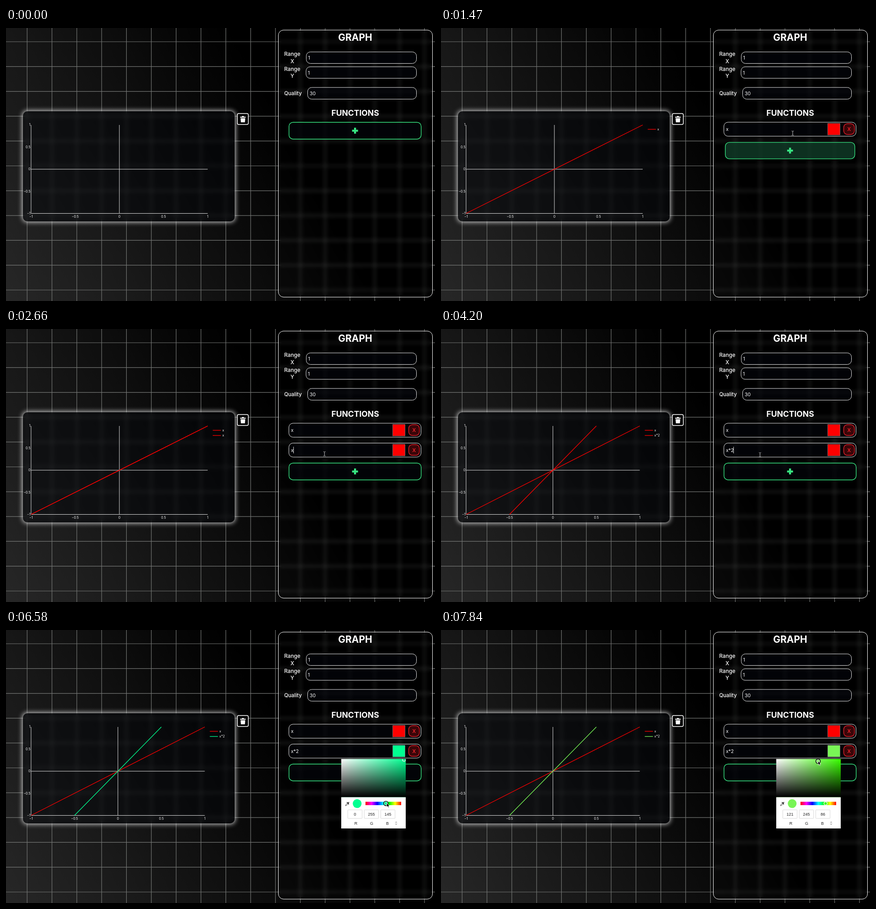
Animation of 938 by 597 pixels, one loop 8 s. Source, as an HTML page:

```html
<!DOCTYPE html>
<html lang="en">
<head>
<meta charset="utf-8">
<title>Graph editor</title>
<style>
html, body { margin: 0; width: 100%; height: 100%; overflow: hidden; background: #000; }
body { position: relative; }
#stage { position: absolute; left: 0; top: 0; width: 938px; height: 597px; overflow: hidden;
  background: linear-gradient(60deg, #272727, #000 65%); }
svg { position: absolute; left: 0; top: 0; font-family: Inter, sans-serif; }
.glass { position: absolute; box-sizing: border-box; }
#card { left: 36.5px; top: 181.5px; width: 463.5px; height: 241px; border-radius: 10px;
  background: rgba(3,5,10,.45); backdrop-filter: blur(5px); box-shadow: 0 0 11px 1px rgba(255,255,255,.85); }
#panel { left: 594.5px; top: 3.5px; width: 338px; height: 585.5px; border-radius: 12px;
  border: 1.6px solid #fff; background: rgba(0,0,0,.1); backdrop-filter: blur(4px); }
</style>
</head>
<body>
<div id="stage">
  <svg width="938" height="597"><path id="grid" stroke="#737573" stroke-width="1.2"/></svg>
  <div id="card" class="glass"></div>
  <div id="panel" class="glass"></div>
  <svg width="938" height="597">
    <defs>
      <linearGradient id="white"><stop stop-color="#fff"/><stop offset="1" stop-color="#fff" stop-opacity="0"/></linearGradient>
      <linearGradient id="black" x2="0" y2="1"><stop stop-opacity="0"/><stop offset="1"/></linearGradient>
      <linearGradient id="hues"></linearGradient>
      <clipPath id="pick"><rect x="733" y="282" width="141" height="152"/></clipPath>
    </defs>
    <g id="fixed"></g>
    <g id="live"></g>
  </svg>
</div>
<script>
const $ = id => document.getElementById(id);
const GREEN = '#38e582', RED = '#f00', PITCH = 43.5;

const text = (x, y, s, size, extra = '') =>
  `<text x="${x}" y="${y}" font-size="${size}" fill="#fff" ${extra}>${s}</text>`;
const mid = 'text-anchor="middle"';
const rect = (x, y, w, h, r, extra) =>
  `<rect x="${x}" y="${y}" width="${w}" height="${h}" rx="${r}" ${extra}/>`;
const path = (d, extra) => `<path d="${d}" ${extra}/>`;
const circle = (x, y, r, extra) => `<circle cx="${x}" cy="${y}" r="${r}" ${extra}/>`;
const field = (x, y, w, h) => rect(x, y, w, h, 9, 'fill="#04050c" fill-opacity=".6" stroke="#e4e4e4"');

// Smoothed value of [time, ...values] keys
function track(keys, t) {
  if (t <= keys[0][0]) return keys[0].slice(1);
  for (let i = 1; i < keys.length; i++) {
    const a = keys[i - 1], b = keys[i];
    if (t < b[0]) {
      const u = (t - a[0]) / (b[0] - a[0]), e = u * u * (3 - 2 * u);
      return a.slice(1).map((v, j) => v + (b[j + 1] - v) * e);
    }
  }
  return keys[keys.length - 1].slice(1);
}

const POINTER = [
  [500, 930, 358], [1000, 768, 229], [1470, 769, 230], [1950, 763, 268], [2170, 761, 267],
  [2260, 761, 267], [2600, 696.3, 273], [3330, 696.3, 273], [3400, 696.8, 273.4], [3600, 696.8, 273.4],
  [3670, 697, 274], [3800, 697, 274], [3870, 697.5, 275], [4730, 697.5, 275], [5000, 770, 302],
  [5420, 856.5, 270.5], [5680, 856.5, 270.5], [6300, 788, 379], [6370, 788, 379], [6580, 832.6, 378.5],
  [6900, 842.86, 380], [7220, 850, 305], [7700, 824.5, 286.5]
];
// Add button: scale, fill opacity
const BUTTON = [
  [740, 1, 0], [960, 1.04, .2], [1200, 1.04, .2], [1340, .955, .2], [1470, .98, .2], [1650, 1, 0],
  [1760, 1, 0], [1930, 1.04, .2], [2060, 1.04, .2], [2170, .966, .2], [2240, .96, .2], [2480, 1, 0],
  [4780, 1, 0], [5000, 1, .08], [5280, 1, 0]
];

function hsv(h, s, v) {
  return [5, 3, 1].map(n => {
    const k = (n + h / 60) % 6;
    return Math.round(255 * v * (1 - s * Math.max(0, Math.min(k, 4 - k, 1))));
  });
}

function drawFixed() {
  let d = '';
  for (let i = 0; i < 18; i++) d += `M${46.2 + 54.3 * i} 0V597`;
  for (let i = 0; i < 11; i++) d += `M0 ${30 + 54.3 * i}H938`;
  $('grid').setAttribute('d', d);
  for (let i = 0; i <= 6; i++)
    $('hues').innerHTML += `<stop offset="${i / 6}" stop-color="hsl(${360 - 60 * i},100%,50%)"/>`;

  const label = (y, s, size, x = 626) => text(x, y, s, size, mid + ' font-weight="500"');
  $('fixed').innerHTML =
    rect(505.8, 187, 24, 24, 3, 'fill="#050505" stroke="#fff" stroke-width="1.5"') +
    path('M512 194h3.5l1-1.5h3l1 1.5h3.5v2h-12zM512.8 197.3h10.4l-.9 9h-8.6z', 'fill="#fff"') +
    text(763.5, 28.2, 'GRAPH', 21, mid + ' font-weight="700"') +
    text(763.5, 192, 'FUNCTIONS', 17.5, mid + ' font-weight="700"') +
    label(61, 'Range', 11.7) + label(77, 'X', 11.5) + label(93.5, 'Range', 11.7) + label(109, 'Y', 11.5) +
    label(147, 'Quality', 11.4, 627.5) +
    field(656.5, 52.3, 241, 25.2) + text(660.5, 69, '1', 10.5) +
    field(656, 84.8, 241.5, 25.2) + text(660, 101.5, '1', 10.5) +
    field(659.5, 130, 238, 25.6) + text(664, 147, '30', 10.5);
}

function graph(end, curves) {
  const left = 54.8, top = 212, base = 405.5, cy = 308.8, w = end - left, cx = left + w / 2;
  let out = path(`M${left} ${top}V${base}H${end}M${left} ${cy}H${end}M${cx} ${top}V${base}`,
    'fill="none" stroke="#e6e6e6" stroke-width=".95"');
  ['−1', '−0.5', '0', '0.5', '1'].forEach((s, i) => {
    out += text(left + w * i / 4, 414.6, s, 7, mid) +
      text(53.4, 408 - 48.4 * i, s, 7, 'text-anchor="end"');
  });
  curves.forEach(([name, slope, color], i) => {
    const y = 221.5 + 11.3 * i, stroke = `stroke="${color}" stroke-width="1.3"`;
    if (slope) {
      const dx = w / 2 / slope;
      out += path(`M${cx - dx} ${base}L${cx + dx} ${top}`, stroke);
    }
    out += path(`M${end + 11} ${y}h17.8`, stroke) + text(end + 32, y + 2.5, name, 7);
  });
  return out;
}

function row(i, name, color, focus) {
  const y = 206 + PITCH * i;
  return field(618.5, y, 289, 30.6) + text(623, y + 19, name, 10.3) +
    (focus ? rect(844.5, y + .5, 29, 30, 0, 'fill="#000" stroke="#fff" stroke-width="1.4"') : '') +
    rect(845.5 + focus, y + 2.5 + focus, 27 - 2 * focus, 25.5 - 2 * focus, 0,
      `fill="${color}" stroke="${focus ? color : '#777'}" stroke-width=".8"`) +
    rect(880.5, y + 3.2, 23.4, 23.6, 8, 'fill="#3a0609" stroke="#e3202a" stroke-width="1.4"') +
    text(892.2, y + 19.2, 'X', 11, mid + ' font-weight="600" style="fill:#f0242c"');
}

function addButton(y, scale, fill) {
  const cy = y + 18.6;
  return `<g transform="translate(763.2 ${cy}) scale(${scale})">` +
    rect(-144.5, -18.4, 289, 36.8, 9, 'fill="#03050b" fill-opacity=".7"') +
    rect(-144.5, -18.4, 289, 36.8, 9, `fill="${GREEN}" fill-opacity="${fill}" stroke="${GREEN}" stroke-width="1.4"`) +
    path('M-6.5 0H6.5M0-6.5V6.5', `stroke="${GREEN}" stroke-width="4.4"`) + '</g>';
}

function ring(x, y, color, active) {
  return active
    ? circle(x, y, 4.8, `fill="${color}" stroke="#000" stroke-width="1.7"`) +
      circle(x, y, 3.6, 'fill="none" stroke="#fff" stroke-width=".9"')
    : circle(x, y, 4.2, 'fill="#888"') +
      circle(x, y, 3.5, `fill="${color}" stroke="#fff" stroke-width="1.2"`);
}

function picker(t, hueX, hue, s, v, rgb) {
  const color = `rgb(${rgb})`, pure = `hsl(${hue},100%,50%)`;
  const area = fill => rect(733, 282, 141, 83.5, 0, `fill="${fill}"`);
  const small = (x, y, str) => text(x, y, str, 9, mid + ' font-family="Liberation Sans, sans-serif" style="fill:#222"');
  let out = rect(733, 282, 141, 152, 0, 'fill="#fff"') + area(pure) + area('url(#white)') + area('url(#black)') +
    ring(Math.min(870.3, 733 + 141 * s), Math.max(283.3, 283.5 + 84 * (1 - v)), color, t >= 7220) +
    path('M742.3 384.2l.4-1.8 4.3-4.3 1.5 1.5-4.3 4.3z', 'fill="#fff" stroke="#222" stroke-width=".9"') +
    path('M745.8 377.2l3.4 3.4M747.6 378.8l2-2', 'stroke="#222" stroke-width="1.7" stroke-linecap="round"') +
    circle(767.8, 379.6, 9.6, `fill="${color}"`) +
    rect(786, 375.6, 78, 7.4, 0, 'fill="url(#hues)"') +
    ring(hueX, 379.3, pure, t >= 6370 && t < 7220) +
    path('M851.5 421.3l1.5-1.8 1.5 1.8M851.5 423.6l1.5 1.8 1.5-1.8', 'fill="none" stroke="#333" stroke-width=".8"');
  rgb.forEach((n, i) => {
    const x = 763 + 36 * i;
    out += rect(x - 15.7, 393.3, 31.4, 18.8, 1, 'fill="#fff" stroke="#d5d5d5" stroke-width=".9"') +
      small(x, 406.2, n) + small(765 + 34.5 * i, 425.6, 'RGB'[i]);
  });
  return `<g clip-path="url(#pick)">${out}</g>`;
}

const CURSORS = {
  arrow: path('M0 0V8.6L2 6.8 3.4 9.8 4.9 9.1 3.6 6.2H6.2Z', 'fill="#000" stroke="#fff" stroke-width=".8"'),
  beam: path('M-2.3-4.8Q-.3-4.8 0-3.6Q.3-4.8 2.3-4.8M0-3.6V3.6M-2.3 4.8Q-.3 4.8 0 3.6Q.3 4.8 2.3 4.8',
    'fill="none" stroke="#ddd" stroke-width=".9"'),
  hand: path('M-1-4.5q1-1 1.6 0v3.2l3.4.8q.8.3.6 1.4l-.7 3.6h-4.2l-2.5-3.4q0-1.2 1.8-.1z',
    'fill="#111" stroke="#ddd" stroke-width=".8"')
};

function cursor(t, x, y, rows) {
  if (t < 500) return '';
  const slot = Math.floor((y - 206) / PITCH), off = y - 206 - slot * PITCH;
  let kind = 'arrow';
  if (t < 5420 && x > 618 && x < 908 && slot >= 0) {
    if (slot === rows && off < 37.5) kind = 'hand';
    else if (slot < rows && off < 30.6 && x < 845) kind = 'beam';
  }
  return `<g transform="translate(${x} ${y})">${CURSORS[kind]}</g>`;
}

function draw(t) {
  const [x, y] = track(POINTER, t), [scale, fill] = track(BUTTON, t);
  const rows = t < 1340 ? 0 : t < 2240 ? 1 : 2;
  const typed = t < 3600 ? 'x' : t < 4200 ? 'x*' : 'x*2';
  const name = t < 3670 ? 'x' : typed;

  const hueX = t < 6370 ? 786 : track(POINTER, Math.min(t, 6900))[0] - 2;
  const hue = 360 * (1 - (hueX - 786) / 78);
  const inArea = t >= 7220;
  const s = inArea ? (x - 733) / 141 : 1, v = inArea ? 1 - (y - 283.1) / 84 : 1;
  const rgb = hsv(hue, s, v), color = `rgb(${rgb})`;

  const curves = [['x', 1, RED], [name, { x: 1, 'x*': 0, 'x*2': 2 }[name], color]].slice(0, rows);
  const end = { x: 441, 'x*': 437.8, 'x*2': 434.6 }[name];

  let out = graph(end, curves);
  if (rows > 0) out += row(0, 'x', RED, 0);
  if (rows > 1) out += row(1, typed, color, t >= 5550 && t < 6370 ? 1 : 0);
  if ((t >= 2600 && t < 3130) || (t >= 3600 && t < 4730)) {
    const cx = { x: 628.7, 'x*': 634.2, 'x*2': 639.7 }[typed];
    out += path(`M${cx} 257.5V272`, 'stroke="#fff" stroke-width=".9"');
  }
  out += addButton(206 + PITCH * rows, scale, fill);
  if (t >= 5550) out += picker(t, hueX, hue, s, v, rgb);
  $('live').innerHTML = out + cursor(t, x, y, rows);
}

function loop() {
  draw(performance.now() % 8000);
  requestAnimationFrame(loop);
}
drawFixed();
loop();
</script>
</body>
</html>
```
